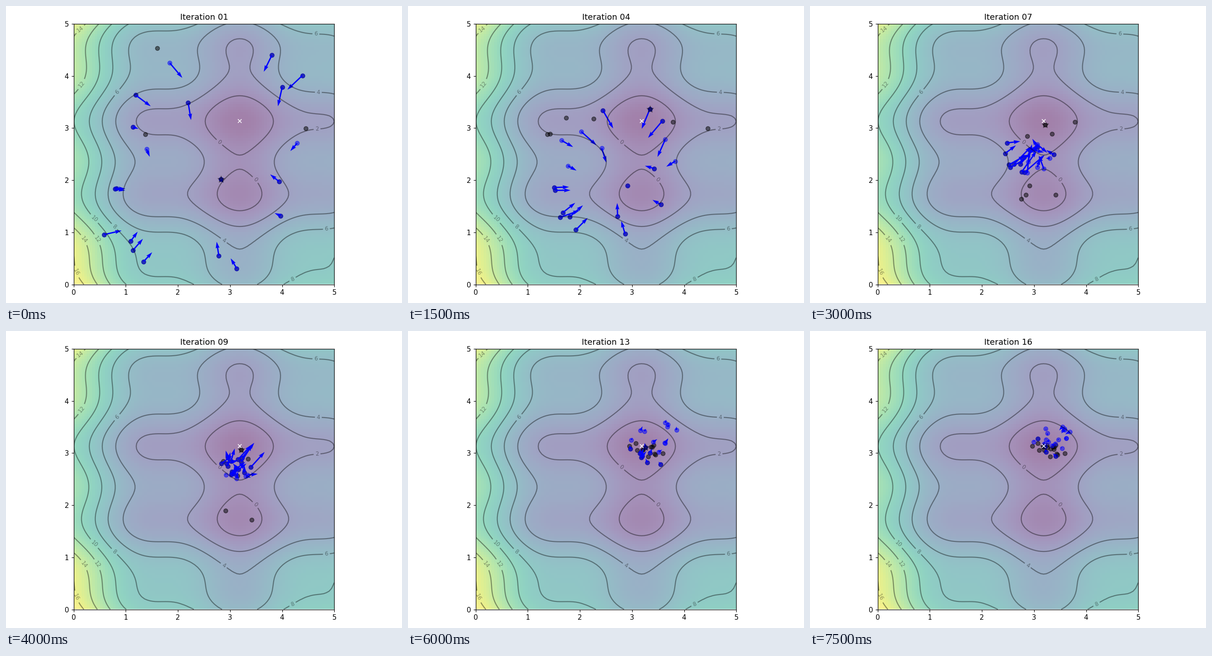
These frames come from a looping animation (864x648 px, 8 s). A matplotlib script:

```python
import numpy as np
import matplotlib.pyplot as plt
from matplotlib.animation import FuncAnimation

W, H, DPI = 864, 648, 108
STEPS = 16
N_PARTICLES = 20
INERTIA, C_SELF, C_SWARM = 0.8, 0.1, 0.1


def objective(x, y):
    return ((x - 3.14) ** 2 + (y - 2.72) ** 2
            + np.sin(3 * x + 1.41) + np.sin(4 * y - 1.73))


def simulate(steps):
    """Run the particle swarm and return (X, V, pbest, gbest) per update."""
    rng = np.random.RandomState(100)
    X = rng.rand(2, N_PARTICLES) * 5
    V = rng.randn(2, N_PARTICLES) * 0.1
    pbest, pbest_obj = X.copy(), objective(*X)
    gbest = pbest[:, pbest_obj.argmin()].copy()
    states = []
    for _ in range(steps):
        r1, r2 = rng.rand(2)
        V = (INERTIA * V + C_SELF * r1 * (pbest - X)
             + C_SWARM * r2 * (gbest.reshape(-1, 1) - X))
        X = X + V
        obj = objective(*X)
        better = pbest_obj >= obj
        pbest = np.where(better, X, pbest)
        pbest_obj = np.minimum(pbest_obj, obj)
        gbest = pbest[:, pbest_obj.argmin()].copy()
        states.append((X, V, pbest, gbest))
    return states


# The first update happens before anything is shown.
states = simulate(STEPS + 1)[1:]
X, V, pbest, gbest = states[0]

grid = np.linspace(0, 5, 100)
x, y = np.meshgrid(grid, grid)
z = objective(x, y)
best = z.argmin()

fig, ax = plt.subplots(figsize=(W / DPI, H / DPI), dpi=DPI)
ax.imshow(z, extent=[0, 5, 0, 5], origin="lower", cmap="viridis", alpha=0.5)
ax.plot([x.flat[best]], [y.flat[best]], marker="x", markersize=5, color="white")
contours = ax.contour(x, y, z, 10, colors="black", alpha=0.4)
ax.clabel(contours, inline=True, fontsize=8, fmt="%.0f")

pbest_plot = ax.scatter(*pbest, marker="o", color="black", alpha=0.5)
swarm_plot = ax.scatter(*X, marker="o", color="blue", alpha=0.5)
arrows = ax.quiver(*X, *V, color="blue", width=0.005,
                   angles="xy", scale_units="xy", scale=1)
gbest_plot = ax.scatter(*gbest, marker="*", s=100, color="black", alpha=0.4)

ax.set_xlim(0, 5)
ax.set_ylim(0, 5)
side = 568.5
ax.set_position([147.75 / W, 40.5 / H, side / W, side / H])


def animate(i):
    X, V, pbest, gbest = states[i]
    ax.set_title(f"Iteration {i + 1:02d}")
    pbest_plot.set_offsets(pbest.T)
    swarm_plot.set_offsets(X.T)
    arrows.set_offsets(X.T)
    arrows.set_UVC(*V)
    gbest_plot.set_offsets(gbest.reshape(1, -1))
    return pbest_plot, swarm_plot, arrows, gbest_plot


anim = FuncAnimation(fig, animate, frames=STEPS, interval=500,
                     blit=False, repeat=True)
plt.show()
```
